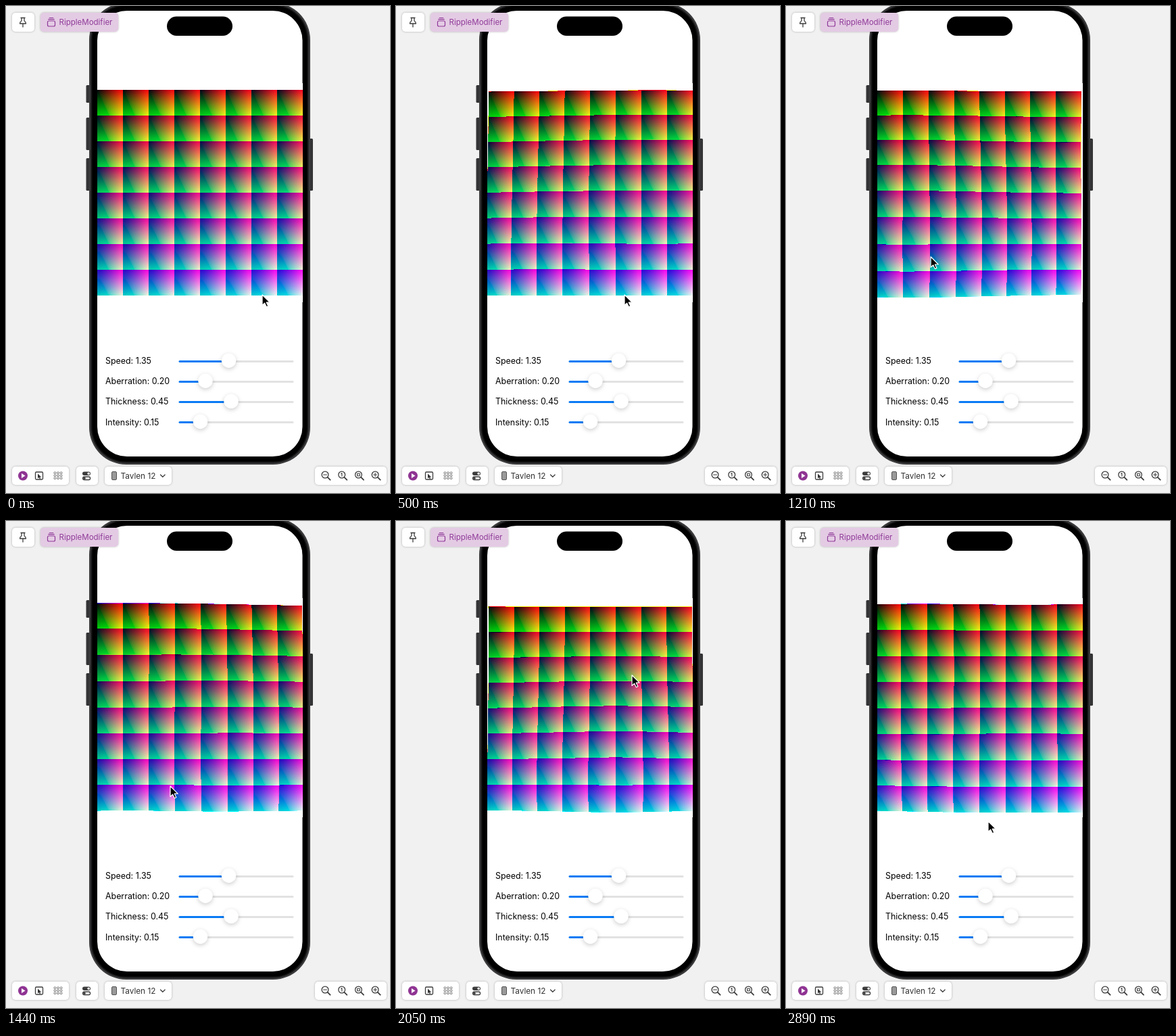
An HTML page with a canvas for the animation above (2.92 s loop, 568x720 px).

```html
<!DOCTYPE html>
<html lang="en">
<head>
<meta charset="utf-8">
<title>Ripple preview</title>
<style>
  html, body { margin: 0; width: 100%; height: 100%; overflow: hidden; background: #f1f1f1; }
  svg, canvas { position: absolute; left: 0; top: 0; }
  #art { left: 135px; top: 114px; }
  text { font-family: Inter, Roboto, sans-serif; }
  .panel { fill: #fff; filter: drop-shadow(0 .5px 1.5px rgba(0, 0, 0, .28)); }
  .knob { fill: #fff; filter: drop-shadow(0 2px 3px rgba(0, 0, 0, .2)); }
  .line { fill: none; stroke: #3c3c3c; stroke-width: 1.3; stroke-linecap: round; stroke-linejoin: round; }
</style>
</head>
<body>
<svg id="ui" width="568" height="720">
  <!-- phone -->
  <g fill="#343436">
    <rect x="118.5" y="117" width="7" height="26" rx="1.5"/>
    <rect x="118.5" y="165" width="7" height="48" rx="1.5"/>
    <rect x="118.5" y="225" width="7" height="48" rx="1.5"/>
    <rect x="447" y="196" width="7" height="77" rx="1.5"/>
  </g>
  <rect x="123" y="-5" width="327" height="683" rx="55" fill="#3b3b3d"/>
  <rect x="125.5" y="-2.5" width="322" height="678" rx="52.5" fill="#171718"/>
  <rect x="127.5" y="-.5" width="318" height="674" rx="50.5"/>
  <rect x="135" y="7" width="303.5" height="659" rx="44" fill="#fff"/>
  <rect x="238" y="15.5" width="97" height="28.5" rx="14.25"/>
  <g id="sliders"></g>

  <!-- top bar -->
  <rect class="panel" x="9" y="10" width="33" height="28" rx="5"/>
  <path class="line" d="M22 17.5h6M23 17.5v4.5q-2.5 1.5-2.5 4h9q0-2.5-2.5-4v-4.5M25 26v5"/>
  <rect class="panel" x="51" y="10" width="115" height="28" rx="5" style="fill:#e4cbe4"/>
  <g fill="none" stroke="#8f3b98" stroke-width="1.2" stroke-linecap="round">
    <rect x="61.5" y="22" width="11" height="8" rx="2"/>
    <path d="M62.8 19.7h8.4M64.2 17.5h5.6"/>
  </g>
  <text x="78.5" y="28" font-size="11.5" fill="#8f3b98">RippleModifier</text>

  <!-- bottom bar -->
  <rect class="panel" x="9" y="681" width="84" height="27" rx="5"/>
  <rect class="panel" x="104" y="681" width="32" height="27" rx="5"/>
  <rect class="panel" x="146" y="681" width="99" height="27" rx="5"/>
  <rect class="panel" x="457" y="681" width="106" height="27" rx="5"/>
  <circle cx="25" cy="694.5" r="7" fill="#8f3493"/>
  <path d="M23 691v7l5.5-3.5z" fill="#fff"/>
  <rect class="line" x="43.5" y="689" width="11" height="11" rx="1.5"/>
  <path d="M47 691.5v7l1.7-1.5 1.2 2.3 1.2-.6-1.1-2.2h2.3z" fill="#333"/>
  <g id="grid" fill="none" stroke="#777" stroke-width=".9"></g>
  <rect x="113" y="688.5" width="12" height="5.5" rx="2.75" fill="#3c3c3c"/>
  <circle cx="122.2" cy="691.25" r="1.8" fill="#fff"/>
  <rect class="line" x="113.6" y="696" width="11" height="4.5" rx="2.25"/>
  <circle cx="116" cy="698.25" r="1.7" fill="#3c3c3c"/>
  <rect x="156.5" y="688.5" width="7" height="12" rx="1.5" fill="#999" stroke="#555"/>
  <text x="169.5" y="698.5" font-size="11.8" fill="#333">Tavlen 12</text>
  <path class="line" d="M228.5 693l3.3 3.3 3.3-3.3"/>
  <g id="zoom"></g>
</svg>
<canvas id="art" width="304" height="324"></canvas>
<svg width="568" height="720">
  <g id="ring" fill="none">
    <circle r="22" stroke="#fff" stroke-width="3.4" opacity=".75"/>
    <circle r="22" stroke="#111" stroke-width="1.6"/>
  </g>
  <path id="pointer" d="M0 0v15.5l3.6-3.3 2.7 5.6 2.5-1.2-2.6-5.4h5z" stroke="#fff" stroke-width="1.2" stroke-linejoin="round"/>
</svg>
<script>
const LOOP = 2920, SIZE = 304, PAD = 10, TILE = 38, BAND = 220, SHIFT = 3;
const $ = id => document.getElementById(id);

$('sliders').innerHTML = [
  ['Speed: 1.35', 329.5], ['Aberration: 0.20', 295], ['Thickness: 0.45', 333], ['Intensity: 0.15', 287.5]
].map(([label, x], i) => {
  const y = 525 + i * 30.1;
  const top = Math.round(y - 1.5);
  return `<text x="147" y="${y + 4.2}" font-size="12.4">${label}</text>
    <rect x="255.5" y="${top}" width="170" height="3" rx="1.5" fill="#e2e2e3"/>
    <rect x="255.5" y="${top}" width="${x - 255.5}" height="3" rx="1.5" fill="#0a7bf5"/>
    <circle class="knob" cx="${x}" cy="${y - .8}" r="10.7"/>`;
}).join('');

$('grid').innerHTML = [...Array(9).keys()].map(i =>
  `<rect x="${71 + i % 3 * 4.6}" y="${689 + (i / 3 | 0) * 4}" width="2.8" height="2.4" rx=".4"/>`).join('');

$('zoom').innerHTML = ['M-2.5 0h5', 'M-1-1.5l1.2-.8v4.6', 'M-1.8-1.8h3.6v3.6h-3.6z', 'M-2.5 0h5M0-2.5v5']
  .map((mark, i) => `<g class="line" transform="translate(${472 + i * 24.7} 693)">
    <circle r="4.9"/><path d="M3.6 3.6l4 4" stroke-width="1.8"/><path d="${mark}" stroke-width="1.1"/></g>`).join('');

// time, x, y
const taps = [[20, 379, 427], [940, 179, 345], [1810, 325, 385], [2360, 351, 222]];
const path = [
  [0, 379, 427], [70, 379, 427], [500, 338, 427], [830, 179, 345], [950, 179, 345], [1440, 243, 392],
  [1700, 325, 385], [1820, 325, 385], [2050, 349, 228], [2250, 351, 221], [2480, 351, 221], [2890, 299, 444], [LOOP, 299, 444]
];

const smooth = (a, b, t) => {
  const k = Math.min(1, Math.max(0, (t - a) / (b - a)));
  return k * k * (3 - 2 * k);
};

function pointerAt(t) {
  const i = Math.max(1, path.findIndex(p => p[0] > t));
  const [t0, x0, y0] = path[i - 1], [t1, x1, y1] = path[i];
  const k = smooth(t0, t1, t);
  return [x0 + (x1 - x0) * k, y0 + (y1 - y0) * k];
}

// One channel of the 8 x 8 colour cube; white outside
function sample(x, y, channel) {
  if (x < 0 || y < 0 || x >= SIZE || y >= SIZE) return 255;
  const u = x % TILE / TILE, v = y % TILE / TILE;
  const blue = (Math.floor(y / TILE) * 8 + Math.floor(x / TILE)) / 63;
  if (channel === 1) return v * (200 + 45 * u) + 3;
  if (channel === 2) return blue * (205 + 30 * u) + 10;
  // wide-gamut red clips to zero where green dominates
  const red = 1.22 * u ** 2.2 - .22 * v ** 2.2 + .03 * blue ** 2.2;
  return 240 * Math.min(1, Math.max(0, red)) ** (1 / 2.2);
}

const ctx = $('art').getContext('2d');
const image = ctx.createImageData(SIZE, SIZE + 2 * PAD);
image.data.fill(255);

function drawArt(t) {
  const [start, tapX, tapY] = taps.filter(tap => tap[0] <= t).pop() || taps[0];
  const age = t - start, front = 75 + .45 * age;
  const gain = SHIFT * smooth(100, 220, age) * (1 - smooth(560, 740, age));
  for (let y = 0, i = 0; y < SIZE + 2 * PAD; y++) {
    for (let x = 0; x < SIZE; x++, i += 4) {
      const px = x + .5, py = y + .5 - PAD;
      const dx = px + 135 - tapX, dy = py + 124 - tapY, d = Math.hypot(dx, dy);
      const phase = (front - d) / BAND;
      const push = Math.abs(phase) < 1 ? gain * Math.sin(Math.PI * phase) / Math.max(d, 8) : 0;
      for (let c = 0; c < 3; c++) {
        const k = push * (1.1 - .1 * c);
        image.data[i + c] = sample(px - dx * k, py - dy * k, c);
      }
    }
  }
  ctx.putImageData(image, 0, 0);
}

function frame(now) {
  const t = now % LOOP;
  drawArt(t);
  const place = `translate(${pointerAt(t).join(' ')})`;
  $('pointer').setAttribute('transform', place);
  $('ring').setAttribute('transform', place);
  $('ring').style.display = taps.some(([start]) => start > 100 && t > start - 110 && t < start) ? '' : 'none';
  requestAnimationFrame(frame);
}
requestAnimationFrame(frame);
</script>
</body>
</html>
```
